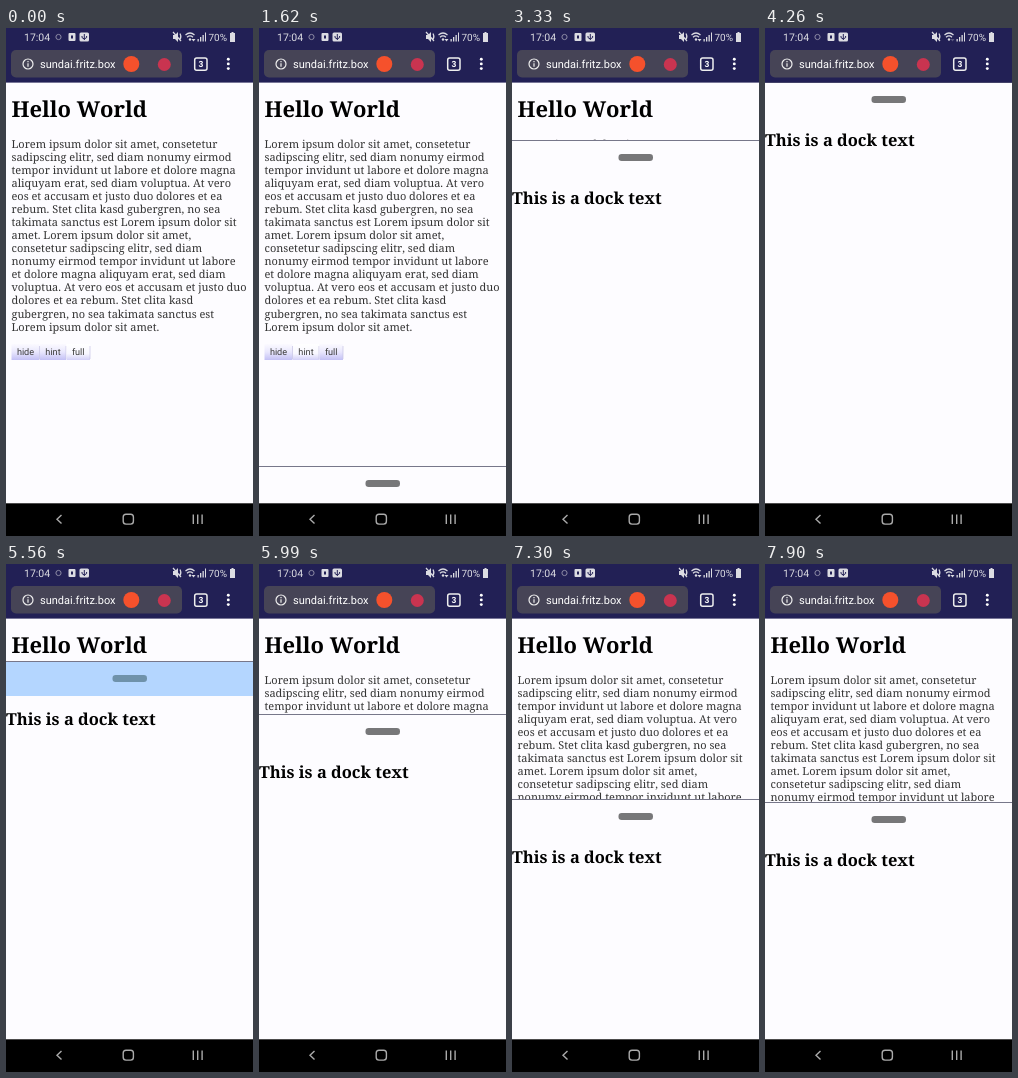
An HTML page for the animation above (8000 ms loop, 247x508 px).

```html
<!DOCTYPE html>
<html lang="en">
<head>
<meta charset="utf-8">
<title>Dock</title>
<style>
  html, body { margin: 0; height: 100%; overflow: hidden; background: #fdfcff; }
  svg { display: block; width: 100vw; height: 100vh; }
  text { text-rendering: geometricPrecision; white-space: pre; }
  .serif { font-family: "Noto Serif", serif; font-kerning: none; }
  .sans { font-family: Roboto, sans-serif; }
  .bold { font-weight: 700; }
</style>
</head>
<body>
<svg viewBox="0 0 247 508">
  <defs>
    <linearGradient id="face" x2="0" y2="1">
      <stop offset="0" stop-color="#fbfaff"/>
      <stop offset=".5" stop-color="#e9e7fd"/>
      <stop offset="1" stop-color="#c3c0f5"/>
    </linearGradient>
    <linearGradient id="focus" x2="0" y2="1">
      <stop offset="0" stop-color="#fff"/>
      <stop offset=".6" stop-color="#f8f7ff"/>
      <stop offset="1" stop-color="#d3d0f8"/>
    </linearGradient>
  </defs>

  <rect width="247" height="508" fill="#fdfcff"/>
  <text class="serif bold" x="5.5" y="89.3" font-size="21.96">Hello World</text>
  <g id="copy" class="serif" font-size="10.98" fill="#333"></g>
  <g id="buttons" class="sans" font-size="9.15" fill="#3a3a3a" text-anchor="middle"></g>

  <g id="dock">
    <rect width="247" height="460" fill="#fdfcff"/>
    <rect id="tap" width="247" height="35" fill="#b4d6ff"/>
    <rect width="247" height="1" fill="#77778a"/>
    <rect id="grip" x="106.5" y="14" width="34.5" height="7" rx="3.2"/>
    <text class="serif bold" y="63.7" font-size="16.47">This is a dock text</text>
  </g>

  <!-- status bar and browser toolbar -->
  <rect width="247" height="54.6" fill="#222055"/>
  <g class="sans" fill="#dcdce2" font-size="10.5">
    <text x="18" y="12.7">17:04</text>
    <text x="202.5" y="12.7" font-size="10">70%</text>
    <circle cx="52.5" cy="9" r="2.6" fill="none" stroke="#8c8aa4"/>
    <rect x="62.5" y="5" width="7" height="8" rx="1"/>
    <rect x="65" y="7.5" width="2" height="3" fill="#222055"/>
    <rect x="73.5" y="4.5" width="9.5" height="9" rx="1.5"/>
    <path d="M78.3 6v6M76 8v1.6l2.3 1.4 2.3-1.4V8" fill="none" stroke="#222055"/>
    <path d="M167 7h2l3-3v10l-3-3h-2z"/>
    <path d="M167 4l8 9M174 5.5q1.8 3 0 6" fill="none" stroke="#dcdce2" stroke-width="1.2"/>
    <path d="M179.500 7q4.500-4 9 0M181 9.200q3-2.500 6 0" fill="none" stroke="#dcdce2" stroke-width="1.2"/>
    <circle cx="184" cy="11.500" r="1.2"/>
    <path id="traffic" d="M185.500 11h4l-2 2.500z"/>
    <path d="M191.500 11h1.300v2.500h-1.300zM194 9h1.300v4.500h-1.300zM196.500 7h1.300v6.500h-1.300zM199 4.500h1v9h-1z"/>
    <path d="M225.500 4h2v1h1.500v9h-5V5h1.500z"/>
  </g>
  <rect x="5" y="22" width="171" height="27.5" rx="5" fill="#464456"/>
  <g fill="none" stroke="#eee" stroke-width="1.2">
    <circle cx="22" cy="36" r="5"/>
    <path d="M22 35.300v3.500M22 33v1.300"/>
    <rect x="188.700" y="30" width="12.300" height="12.300" rx="2" stroke-width="1.5"/>
  </g>
  <g class="sans" fill="#fff">
    <text x="34" y="39.8" font-size="11">sundai.fritz.box</text>
    <text x="194.9" y="39.3" font-size="8.5" font-weight="700" text-anchor="middle">3</text>
    <circle cx="222.3" cy="31.2" r="1.45"/>
    <circle cx="222.3" cy="35.9" r="1.45"/>
    <circle cx="222.3" cy="40.6" r="1.45"/>
  </g>
  <circle cx="125.3" cy="36" r="8" fill="#f5512c"/>
  <circle cx="158.3" cy="36.5" r="6.5" fill="#c93450"/>

  <!-- navigation bar -->
  <rect y="475.3" width="247" height="33"/>
  <g fill="none" stroke="#aaa" stroke-width="1.4">
    <path d="M55.5 487l-4.500 4.300 4.500 4.300"/>
    <rect x="117.200" y="486.300" width="10.200" height="9.800" rx="2.800"/>
    <path d="M187.300 486.500v9.500M191.700 486.500v9.500M196.100 486.500v9.500"/>
  </g>
</svg>

<script>
const LOOP = 8000;
const $ = id => document.getElementById(id);

const lines = [
  "Lorem ipsum dolor sit amet, consetetur",
  "sadipscing elitr, sed diam nonumy eirmod",
  "tempor invidunt ut labore et dolore magna",
  "aliquyam erat, sed diam voluptua. At vero",
  "eos et accusam et justo duo dolores et ea",
  "rebum. Stet clita kasd gubergren, no sea",
  "takimata sanctus est Lorem ipsum dolor sit",
  "amet. Lorem ipsum dolor sit amet,",
  "consetetur sadipscing elitr, sed diam",
  "nonumy eirmod tempor invidunt ut labore",
  "et dolore magna aliquyam erat, sed diam",
  "voluptua. At vero eos et accusam et justo duo",
  "dolores et ea rebum. Stet clita kasd",
  "gubergren, no sea takimata sanctus est",
  "Lorem ipsum dolor sit amet."
];
$("copy").innerHTML = lines
  .map((line, i) => `<text x="5.5" y="${120 + i * 13.04}">${line}</text>`).join("");

const buttons = [["hide", 5.5, 28], ["hint", 34, 26], ["full", 60.5, 23.5]];
$("buttons").innerHTML = buttons.map(([label, x, w]) =>
  `<rect x="${x}" y="316" width="${w}" height="16"/>
   <path d="M${x + w} 318v13" stroke="#c6c3e4" stroke-width=".7"/>
   <text x="${x + w / 2}" y="327.2">${label}</text>`).join("");
const faces = $("buttons").querySelectorAll("rect");

const linear = p => p;
const smooth = p => p * p * (3 - 2 * p);

// Dock top: [time, y, easing towards this key]
const keys = [
  [0, 476], [1500, 476], [1830, 350, smooth],
  [2880, 350], [3510, 54, smooth],
  [5470, 54], [5560, 97], [5990, 150], [6270, 193],
  [6290, 193], [6690, 230], [7010, 234],
  [7130, 234], [7900, 238], [LOOP, 238]
];

function dockTop(t) {
  const i = keys.findIndex(key => key[0] > t);
  const [t0, y0] = keys[i - 1], [t1, y1, ease = linear] = keys[i];
  return y0 + (y1 - y0) * ease((t - t0) / (t1 - t0));
}

function draw(now) {
  const t = now % LOOP;
  const touched = t >= 5470 && t < 5680;
  const focused = t >= 1500 && t < 2900 ? 1 : 2;
  $("dock").setAttribute("transform", `translate(0 ${Math.round(dockTop(t))})`);
  $("tap").setAttribute("opacity", touched ? 1 : 0);
  $("grip").setAttribute("fill", touched ? "#6f92aa" : "#777779");
  $("traffic").setAttribute("opacity", t >= 4260 && t < 5310 ? .3 : 1);
  faces.forEach((face, i) =>
    face.setAttribute("fill", i === focused ? "url(#focus)" : "url(#face)"));
  requestAnimationFrame(draw);
}
requestAnimationFrame(draw);
</script>
</body>
</html>
```
